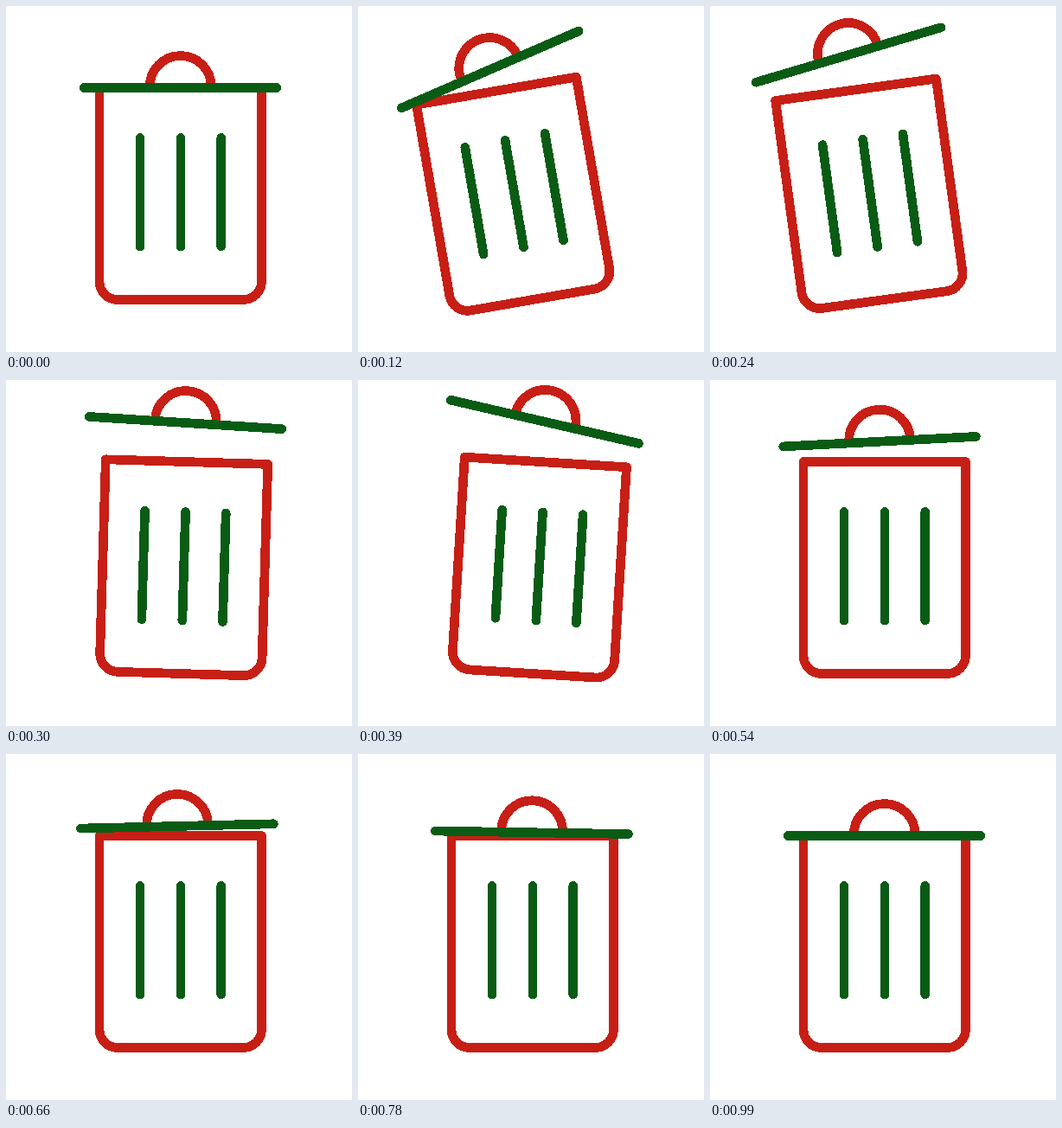
An HTML page that plays this animation: 400x400 px, repeating every 3.02 s.

```html
<!DOCTYPE html>
<html lang="en">
<head>
<meta charset="utf-8">
<title>Bin</title>
<style>
  html, body { margin: 0; height: 100%; overflow: hidden; background: #fff; }
  svg { display: block; width: 100vw; height: 100vh; shape-rendering: crispEdges; }
  path { fill: none; stroke-width: 10.7; stroke-linecap: round; stroke-linejoin: round; }
  .red { stroke: #c71f16; }
  .green { stroke: #0a5c15; }
</style>
</head>
<body>
<svg viewBox="0 0 400 400">
  <g id="bin">
    <path class="red" d="M108 94.5H295.5V318.5a21 21 0 0 1-21 21H129a21 21 0 0 1-21-21Z"/>
    <path class="green" d="M155 152.5V278M202 152.5V278M248.7 152.5V278"/>
    <g id="lid">
      <path class="red" d="M166.2 93A35.5 35.5 0 0 1 237.2 93"/>
      <path class="green" d="M90 94.5H313"/>
    </g>
  </g>
</svg>
<script>
const LOOP = 3020, STEP = 30;
const bin = document.getElementById('bin');
const lid = document.getElementById('lid');

const progress = (t, from, to) => Math.min(1, Math.max(0, (t - from) / (to - from)));

// Eased change by the given amount between two times
function move(t, from, to, amount) {
  const u = progress(t, from, to);
  return amount * u * u * (3 - 2 * u);
}

// The bin leans left, then right, then stands
const swing = t => move(t, 0, 130, -10) + move(t, 208, 340, 15) + move(t, 340, 480, -5);

// The lid rocks with shrinking turns
const tilt = t => move(t, 0, 145, -14.8) + move(t, 175, 375, 24.5)
  + move(t, 375, 555, -12.9) + move(t, 555, 780, 4.1) + move(t, 780, 990, -0.9);

const shift = t => move(t, 0, 100, -2.7) + move(t, 300, 540, -2.8) + move(t, 540, 840, 5.5);

// The lid flies up, slowing, then settles back
function lift(t) {
  const up = 1 - (1 - progress(t, 0, 365)) ** 2;
  const down = (1 - progress(t, 390, 990)) ** 2.4;
  return -46.5 * up * down;
}

function draw(now) {
  const t = Math.floor((now % LOOP) / STEP) * STEP;
  bin.setAttribute('transform', `rotate(${swing(t)} 202 339.5)`);
  lid.setAttribute('transform',
    `translate(${shift(t)} ${lift(t)}) rotate(${tilt(t)} 201.5 94.5)`);
}

let start;
function frame(now) {
  start ??= now;
  draw(now - start);
  requestAnimationFrame(frame);
}
draw(0);
requestAnimationFrame(frame);
</script>
</body>
</html>
```
